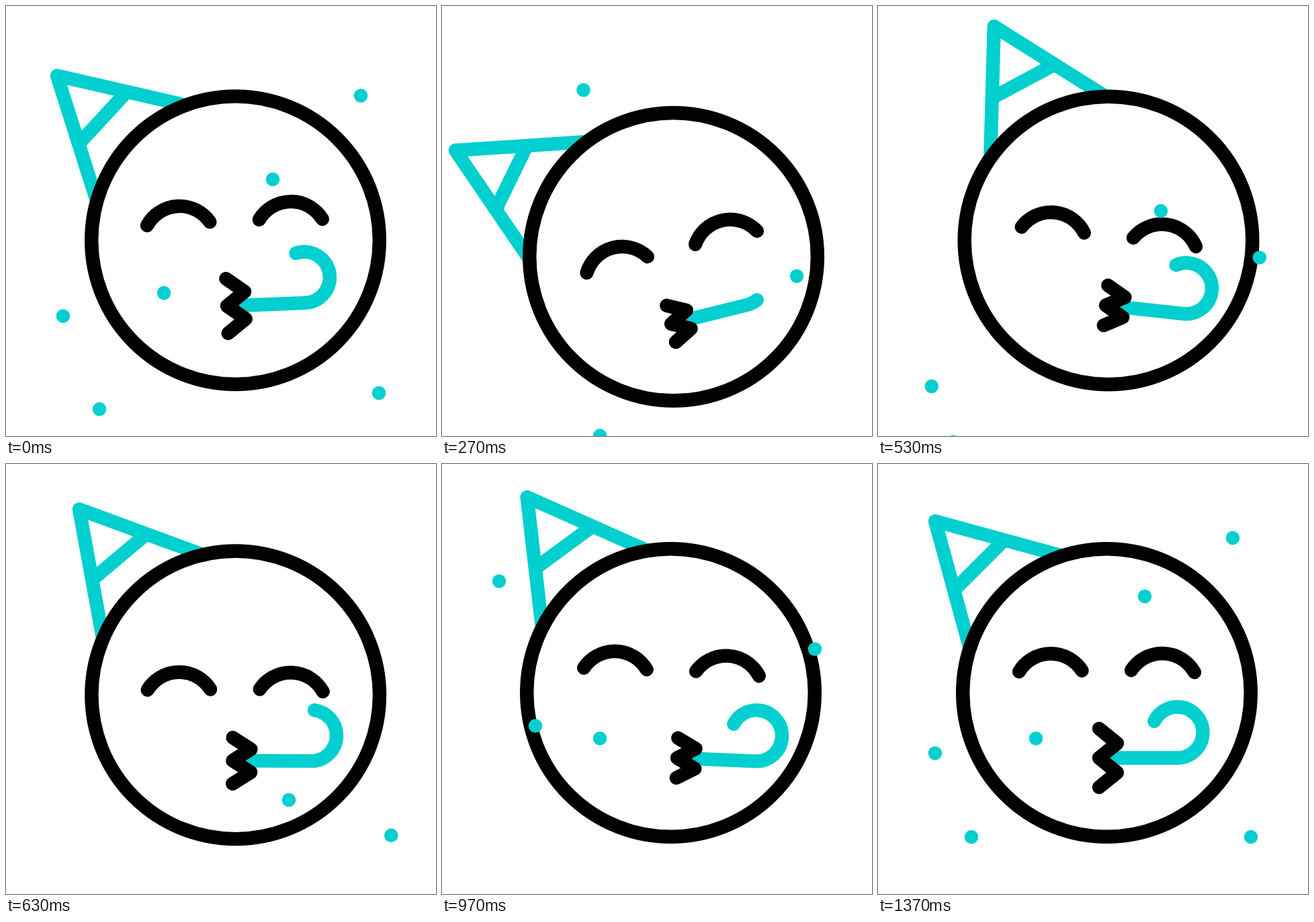
Animation, 640 px wide and 640 px high, one loop 1.67 s. Source, as an HTML page with a canvas:

```html
<!DOCTYPE html>
<html lang="en">
<head>
<meta charset="utf-8">
<title>Party face</title>
<style>
  html, body { margin: 0; width: 100%; height: 100%; overflow: hidden; background: #fff; }
  canvas { display: block; }
</style>
</head>
<body>
<canvas id="stage" width="640" height="640"></canvas>
<script>
const ctx = document.getElementById('stage').getContext('2d');
const LOOP = 1670, LAST = 41, CYAN = '#02cfcf', RAD = Math.PI / 180;

// Smooth monotone curve through values at the given steps, coming to rest at the last.
const curve = steps => (...values) => {
  const rate = values.slice(1).map((v, i) => (v - values[i]) / (steps[i + 1] - steps[i]));
  const slope = values.map((_, i) => {
    const a = rate[i - 1] ?? rate[i], b = rate[i] ?? 0;
    return a * b > 0 ? 2 * a * b / (a + b) : 0;
  });
  return n => {
    const i = Math.max(1, steps.findIndex(step => step >= n)) - 1;
    const h = steps[i + 1] - steps[i], u = (n - steps[i]) / h, w = 1 - u;
    return w * w * ((1 + 2 * u) * values[i] + u * h * slope[i]) +
           u * u * ((1 + 2 * w) * values[i + 1] - w * h * slope[i + 1]);
  };
};

const shift = curve([0, 4, 11, 16, 23, 29, LAST]);
const headX = shift(1, 3.5, 4.2, 2.5, 0, 0, 0);
const headY = shift(8.2, 35, 29, 8.5, 0, 0, 0);
const eyesX = shift(-1.1, -3.1, -1.8, .5, -2, 1, 0);
const eyesY = shift(-27.8, -14.5, -6.2, -6.5, -10, -32, -32);
const mouthX = shift(-12.5, -14, 3.3, -4, -4.5, 9.5, -11.5);
const mouthY = shift(97.8, 101, 98.4, 96.5, 99.5, 97, 97);
const squeeze = shift(.932, .766, .6, .687, .885, .68, 1);

const swing = curve([0, 4, 8, 11, 16, 17, 22, 23, 29, 31, LAST]);
const hatTurn = swing(-2.3, -10.5, -19, -8.4, 16.9, 18, -19.2, -17.8, 8.7, 9.7, 0);
const faceTurn = swing(-2.3, -10.7, -14, -12.9, 6.2, 7, -12, -11.2, 2.4, 2.5, 0);
const curl = swing(197, 36, 25, 55.5, 210, 218, 90, 98, 245, 246, 244);

// Resting dots: x, y, fall speed, gain in speed, landing step, return speed.
const resting = [
  [528, 110, 23.5, .05, 36, 10],
  [397, 197, 61, .007, 35, 20.5],
  [235, 408.5, 18.6, .05, 29, 40.5],
  [85, 430.5, 31, .05, 36, 20.4],
  [139, 555, 45, .05, 33.3, 24.8],
  [555, 555, 21, .05, 37.5, 17.3]
];

// Passing dots: x and sideways drift, then step, height and speed.
const passing = [
  [556.7, .03, 11, 77.5, 59.4],
  [41.3, .068, 11, -5, 114.2],
  [112, 0, 11, 174, 95],
  [210.5, 0, 11, 335, 70],
  [421, 0, 16, 305, 65]
];

function line(...points) {
  ctx.beginPath();
  for (let i = 0; i < points.length; i += 2) ctx.lineTo(points[i], points[i + 1]);
}

function stroke(color) {
  ctx.strokeStyle = color;
  ctx.stroke();
}

function placed(x, y, degrees, paint) {
  ctx.save();
  ctx.translate(x, y);
  ctx.rotate(degrees * RAD);
  paint();
  ctx.restore();
}

function dot(x, y) {
  ctx.beginPath();
  ctx.arc(x, y, 10.3, 0, 7);
  ctx.fillStyle = CYAN;
  ctx.fill();
}

function drawHat() {
  line(-204, -67, -255.5, -255.5, -67, -204);
  stroke(CYAN);
  line(-227, -153, -153, -227);
  stroke(CYAN);
}

function drawHead() {
  ctx.beginPath();
  ctx.arc(0, 0, 214.3, 0, 7);
  ctx.fillStyle = '#fff';
  ctx.fill();
  stroke('#000');
}

const eyes = new Path2D('M-130.5 .5A55 55 0 0 1-37-1M36.5-1.5A55 55 0 0 1 130.5 1.5');
function drawEyes() {
  ctx.strokeStyle = '#000';
  ctx.stroke(eyes);
}

function drawMouth(height, turn) {
  line(20, 0, 116.5, 0);
  ctx.arc(116.5, -38, 38, 90 * RAD, (90 - turn) * RAD, true);
  stroke(CYAN);
  const h = 21.8 * height;
  line(0, -2 * h, 27, -h, 0, 0, 27, h, 0, 2 * h);
  stroke('#000');
}

function drawConfetti(n) {
  for (const [x, y, speed, gain, land, back] of resting) {
    const k = n + 1;
    dot(x, n < 18
      ? y + speed * k * (1 + gain * k) / (1 + gain)
      : y - back * Math.max(0, land - n) ** 1.3);
  }
  for (const [x, drift, step, height, speed] of passing) {
    const y = height + speed * (n - step);
    dot(x + drift * y, y);
  }
}

function draw(n) {
  const x = 340.5 + headX(n), y = 340.5 + headY(n), turn = faceTurn(n);
  ctx.clearRect(0, 0, 640, 640);
  ctx.lineWidth = 20.4;
  ctx.lineCap = ctx.lineJoin = 'round';
  placed(x, y, hatTurn(n), drawHat);
  placed(x, y, 0, drawHead);
  placed(x + mouthX(n), y + mouthY(n), turn, () => drawMouth(squeeze(n), curl(n)));
  placed(x + eyesX(n), y + eyesY(n), turn, drawEyes);
  drawConfetti(n);
}

// Thirty steps a second, timed in hundredths; the last pose rests until the loop ends.
function tick() {
  const t = performance.now() % LOOP;
  draw(Math.min(LAST, Math.floor((Math.floor(t / 10) + .5) * .3)));
  requestAnimationFrame(tick);
}
tick();
</script>
</body>
</html>
```
